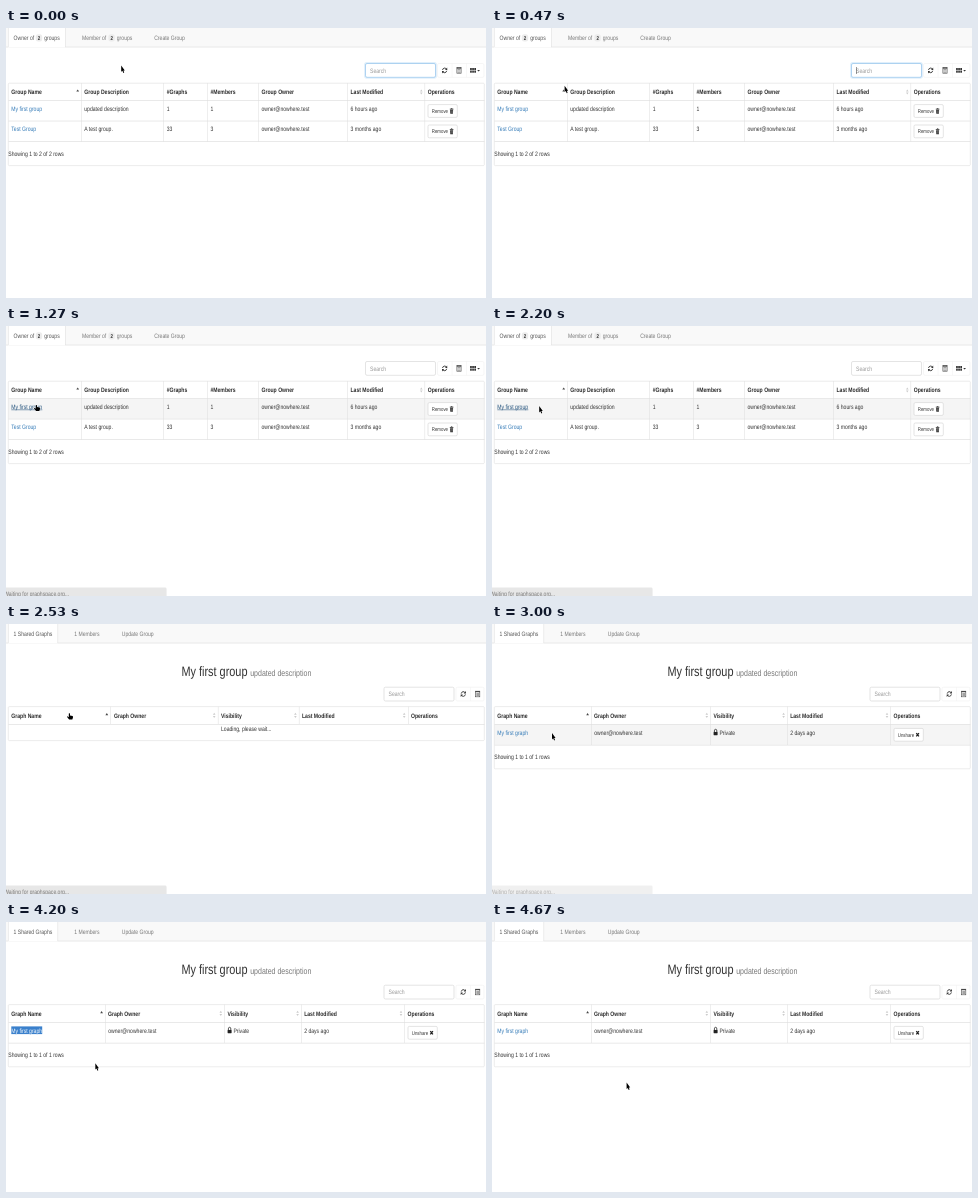
An HTML page for the animation above (4940 ms loop, 480 by 270 pixels).

```html
<!DOCTYPE html>
<html lang="en">
<head>
<meta charset="utf-8">
<title>Group tables</title>
<style>
html, body { margin: 0; width: 100%; height: 100%; overflow: hidden; background: #fff; }
svg { display: block; width: 100vw; height: 100vh; }
text { font-family: "Liberation Sans", Arial, sans-serif; white-space: pre; text-rendering: geometricPrecision; }
</style>
</head>
<body>
<svg id="stage" viewBox="0 0 480 270"></svg>
<script>
const LOOP = 4940, FPS = 15;
const SQUEEZE = 0.8;
const INK = '#333', LINK = '#337ab7', LINE = '#ddd', EDGE = '#d2d2d2';
const MAIL = 'owner@nowhere.test';

// Drawing helpers, all returning SVG markup
const text = (x, y, s, { size = 6.35, fill = INK, bold = false, id = '' } = {}) =>
  `<text ${id && `id="${id}"`} transform="translate(${x} ${y}) scale(${SQUEEZE} 1)" font-size="${size}" fill="${fill}"${bold ? ' font-weight="700"' : ''}>${s}</text>`;
const rect = (x, y, w, h, fill, extra = '') =>
  `<rect x="${x}" y="${y}" width="${w}" height="${h}" fill="${fill}" ${extra}/>`;
const path = (d, extra = '') => `<path d="${d}" ${extra}/>`;
const group = (id, body, extra = '') => `<g id="${id}" ${extra}>${body}</g>`;
const at = (x, y, body) => `<g transform="translate(${x} ${y})">${body}</g>`;
const hline = (y, x = 2.5, w = 476) => rect(x, y, w, 0.65, LINE);
const vline = (x, y, h) => rect(x, y, 0.5, h, LINE);
const bold = (x, y, s) => text(x, y, s, { bold: true, fill: '#2a2a2a' });

const icons = {
  refresh: path('M2-1A2.2 2.5 0 0 0-2.1-.4M-2 1A2.2 2.5 0 0 0 2.1.4', 'fill="none" stroke="#333" stroke-width=".9"') +
    path('M2.6-3V-.5H.4ZM-2.6 3V.5H-.4Z', 'fill="#333"'),
  list: rect(-2.1, -2.8, 4.2, 5.6, 'none', 'stroke="#444" stroke-width=".6"') + rect(-2.1, -2.8, 4.2, 1, INK) +
    [-0.9, 0.3, 1.5].map(y => rect(-1.4, y, 2.8, 0.5, '#444')).join(''),
  grid: [-2.4, 0.2].map(y => [-3.2, -1.1, 1].map(x => rect(x, y, 1.7, 2.1, INK)).join('')).join('') +
    path('M3.9-.5H6.7L5.3 1.2Z', 'fill="#333"'),
  trash: rect(-1.8, -2.2, 3.6, 0.8, INK) + rect(-0.7, -2.9, 1.4, 0.7, INK) +
    path('M-1.5-1.1H1.5L1.3 2.9H-1.3Z', 'fill="#333"') +
    [-0.6, 0.4].map(x => rect(x, -0.5, 0.25, 2.7, '#ccc')).join(''),
  cross: path('M-1.3-1.6L1.3 1.6M1.3-1.6L-1.3 1.6', 'stroke="#222" stroke-width="1.3"'),
  lock: rect(-2, -0.4, 4, 3.3, '#222', 'rx=".4"') +
    path('M-1.2 0V-1.5A1.2 1.5 0 0 1 1.2-1.5V0', 'fill="none" stroke="#222" stroke-width=".8"'),
  asc: path('M-1.4 1L0-1.2L1.4 1Z', 'fill="#444"'),
  both: path('M-1.3-.6L0-2.6L1.3-.6ZM-1.3.6L0 2.6L1.3.6Z', 'fill="#ccc"')
};
const icon = (name, x, y) => at(x, y, icons[name]);

function tabs(width) {
  return rect(0, 0, 480, 19, '#f9f9f9') + hline(18.7, 0, 480) +
    rect(2, -1, width, 20.4, '#fff') + vline(2, 0, 19) + vline(2 + width, 0, 19);
}

function countTab(x, badgeX, label, fill) {
  return text(x, 11.8, label, { fill }) + rect(badgeX, 6.2, 6.4, 7.4, '#ececec', 'rx="2.5"') +
    text(badgeX + 2, 11.8, '2', { size: 5.5, bold: true }) + text(badgeX + 8.4, 11.8, 'groups', { fill });
}

function searchBox(x, y, id) {
  return rect(x, y, 70, 13.8, '#fff', `id="${id}" rx="1.5" stroke="${EDGE}" stroke-width=".6"`) +
    text(x + 4.5, y + 9.2, 'Search', { fill: '#999' });
}

function toolbar(y, edges) {
  const left = edges[0], right = edges[edges.length - 1];
  return rect(left, y, right - left, 13.8, '#fff', 'rx="1.5" stroke="#f0f0f0" stroke-width=".6"') +
    edges.slice(1, -1).map(x => rect(x, y, 0.5, 13.8, '#f0f0f0')).join('');
}

function button(x, y, label, name) {
  return rect(x, y, 29.3, 12.8, '#fff', `rx="1.3" stroke="${EDGE}" stroke-width=".6"`) +
    text(x + 3.8, y + 8.3, label, { size: 5.45 }) + icon(name, x + 23.6, y + 6.3);
}

const frame = (y, h) => rect(2.3, y, 476, h, 'none', `rx="1" stroke="${LINE}" stroke-width=".55"`);
const columns = (xs, y, h) => xs.map(x => vline(x, y, h)).join('');

function groupsPage() {
  const xs = [5.3, 78.3, 160.7, 204.5, 255.5, 344.5, 421.8];
  const heads = ['Group Name', 'Group Description', '#Graphs', '#Members', 'Group Owner', 'Last Modified', 'Operations'];
  const rows = [
    [83, 'My first group', 'updated description', '1', '1', MAIL, '6 hours ago'],
    [103.4, 'Test Group', 'A test group.', '33', '3', MAIL, '3 months ago']
  ];
  const cells = rows.map(([y, ...row], r) => row.map((s, i) =>
    text(xs[i], y, s, i ? {} : { fill: LINK, id: 'group' + r })).join('') +
    button(422, y - 6.4, 'Remove', 'trash')).join('');
  return tabs(57) + countTab(7.6, 29.8, 'Owner of', '#555') + countTab(76, 102.4, 'Member of', '#777') +
    text(148.2, 11.8, 'Create Group', { fill: '#777' }) +
    rect(358.8, 34.8, 71.4, 15.2, 'none', 'id="glow" rx="2" stroke="#66afe9" stroke-opacity=".2" stroke-width="1.4"') +
    searchBox(359.5, 35.5, 'search') + rect(364, 39, 0.5, 7, '#333', 'id="caret"') +
    toolbar(35.5, [431.5, 445.8, 460, 478]) +
    icon('refresh', 438.6, 42.4) + icon('list', 453, 42.4) + icon('grid', 467.3, 42.4) +
    rect(2.5, 73, 475.6, 19.8, '#f5f5f5', 'id="groupHover"') + frame(55.2, 82.4) +
    heads.map((s, i) => bold(xs[i], 65.9, s)).join('') + icon('asc', 71.7, 62.6) + icon('both', 415.3, 64) +
    hline(72.3) + hline(92.7) + hline(113.3) + columns([75.2, 157.4, 201.4, 252.4, 341.4, 418.6], 55.2, 58.4) +
    cells + rect(5.3, 83.6, 31, 0.55, '#23527c', 'id="underline"') +
    text(2.3, 128.3, 'Showing 1 to 2 of 2 rows');
}

function graphHead(xs, lines, sorts, bottom) {
  const heads = ['Graph Name', 'Graph Owner', 'Visibility', 'Last Modified', 'Operations'];
  return heads.map((s, i) => bold(xs[i], 93.5, s)).join('') +
    sorts.map((x, i) => icon(i ? 'both' : 'asc', x, i ? 91.4 : 90.2)).join('') +
    hline(100) + columns(lines, 82.6, bottom - 82.6);
}

function graphsPage() {
  const loading = graphHead([5.3, 108, 215, 296, 405], [104.4, 211.9, 292.9, 402], [100.8, 208.2, 289.4, 398.2], 100) +
    frame(82.6, 34) + text(215, 107.2, 'Loading, please wait...');
  const loaded = rect(2.5, 100.6, 475.6, 20.2, '#f5f5f5', 'id="graphHover"') + frame(82.6, 62.2) +
    graphHead([5.3, 102, 221.4, 298.2, 401.6], [99, 218.4, 295.2, 398.4], [95.6, 214.8, 291.6, 395], 121) + hline(120.8) +
    text(5.3, 110.6, 'My first graph', { fill: LINK }) +
    `<clipPath id="selClip"><rect id="selClipBox" y="104" height="8.6"/></clipPath>` +
    group('selection', rect(0, 104.4, 50, 7.8, '#3a80cc') + text(5.3, 110.6, 'My first graph', { fill: '#fff' }), 'clip-path="url(#selClip)"') +
    text(102.3, 110.6, MAIL) + icon('lock', 223.6, 108.3) + text(227.4, 110.6, 'Private') +
    text(298.2, 110.6, '2 days ago') + button(402, 104.4, 'Unshare', 'cross') +
    text(2.3, 135.3, 'Showing 1 to 1 of 1 rows');
  return tabs(49.6) + text(7.6, 11.8, '1 Shared Graphs', { fill: '#555' }) +
    text(68.2, 11.8, '1 Members', { fill: '#777' }) + text(115.8, 11.8, 'Update Group', { fill: '#777' }) +
    text(175.4, 51.5, 'My first group', { size: 13.65 }) +
    text(244.2, 51.5, 'updated description', { size: 8.75, fill: '#777' }) +
    searchBox(378, 63.2, 'search2') + toolbar(63.2, [450, 464.4, 478]) +
    icon('refresh', 457.3, 70) + icon('list', 471.7, 70) +
    group('loading', loading) + group('loaded', loaded);
}

const outline = 'fill="#000" stroke="#fff" stroke-width=".6" paint-order="stroke" stroke-linejoin="round"';
const stage = document.getElementById('stage');
stage.innerHTML = group('groups', groupsPage()) + group('graphs', graphsPage()) +
  group('status', path('M0 261.6H159Q160.6 261.6 160.6 263V270H0Z', 'fill="#e7e7e7"') +
    text(-1.8, 269.5, '', { fill: '#777', id: 'statusText' })) +
  group('cursor', path('M0 0V6.4L1.2 5.3L2.1 7.5L3 7L2.2 5H3.6Z', `id="arrow" ${outline}`) +
    path('M-1.2.2Q-.6-.4 0 .2V2.1L2.6 2.6Q3.1 2.9 3 4L2.3 6.1H-.9L-2.9 3.7Q-3 2.7-2.2 3L-1.2 3.8Z', `id="hand" ${outline}`));

const el = {};
stage.querySelectorAll('[id]').forEach(node => { el[node.id] = node; });
const show = (node, on) => node.setAttribute('display', on ? 'inline' : 'none');
const within = (k, a, b) => k >= a && k <= b;

// Linear or eased value from [step, value...] keys
function track(keys, k, ease = u => u) {
  if (k <= keys[0][0]) return keys[0].slice(1);
  for (let i = 1; i < keys.length; i++) {
    const a = keys[i - 1], b = keys[i];
    if (k <= b[0]) {
      const u = ease((k - a[0]) / (b[0] - a[0]));
      return a.slice(1).map((v, j) => v + (b[j + 1] - v) * u);
    }
  }
  return keys[keys.length - 1].slice(1);
}
const smooth = u => u * u * (3 - 2 * u);

const cursorKeys = [
  [3, 115.2, 37.4], [11, 30, 78], [12, 30, 78], [14, 31, 79], [26, 31, 79], [29, 47.2, 80],
  [33, 47.2, 80], [38, 64, 89.4], [39, 64, 89.4], [45, 60, 109], [47, 60, 109],
  [55, 19.4, 104.8], [58, 6, 105.4], [60, 6, 105.4], [65, 134.6, 160.6]
];
const statusKeys = [[15, 0], [19, 1], [42, 1], [45, 0.6], [55, 0.27], [58, 0]];

function render(t) {
  const k = Math.floor((t + 5) * FPS / 1000);
  const [x, y] = track(cursorKeys, k, smooth);
  const hand = within(k, 10, 27) || within(k, 37, 39) || within(k, 52, 60);
  el.cursor.setAttribute('transform', `translate(${x} ${y})`);
  show(el.hand, hand);
  show(el.arrow, !hand);

  show(el.groups, k < 35);
  show(el.graphs, k >= 35);
  show(el.loading, k < 40);
  show(el.loaded, k >= 40);

  const focus = track([[15, 1], [18, 0]], k)[0];
  const mix = (a, b) => Math.round(a + (b - a) * focus);
  el.search.setAttribute('stroke', `rgb(${mix(210, 125)},${mix(210, 184)},${mix(210, 232)})`);
  el.glow.setAttribute('opacity', focus);
  show(el.caret, t >= 65 && t < 565);

  const over = within(k, 10, 34);
  show(el.underline, over);
  el.group0.setAttribute('fill', over ? '#23527c' : LINK);
  show(el.groupHover, y > 73 && y < 92.7);
  show(el.graphHover, y > 100.6 && y < 121);

  const selLeft = k > 57 ? 5.3 : Math.max(5.3, x);
  show(el.selection, within(k, 53, 66) && selLeft < 36);
  el.selClipBox.setAttribute('x', selLeft);
  el.selClipBox.setAttribute('width', Math.max(0, 36.2 - selLeft));

  el.status.setAttribute('opacity', track(statusKeys, k)[0]);
  el.statusText.textContent = k < 48 ? 'Waiting for graphspace.org...' : 'graphspace.org/graphs/21761';
}

function tick(now) {
  render(now % LOOP);
  requestAnimationFrame(tick);
}
render(0);
requestAnimationFrame(tick);
</script>
</body>
</html>
```
